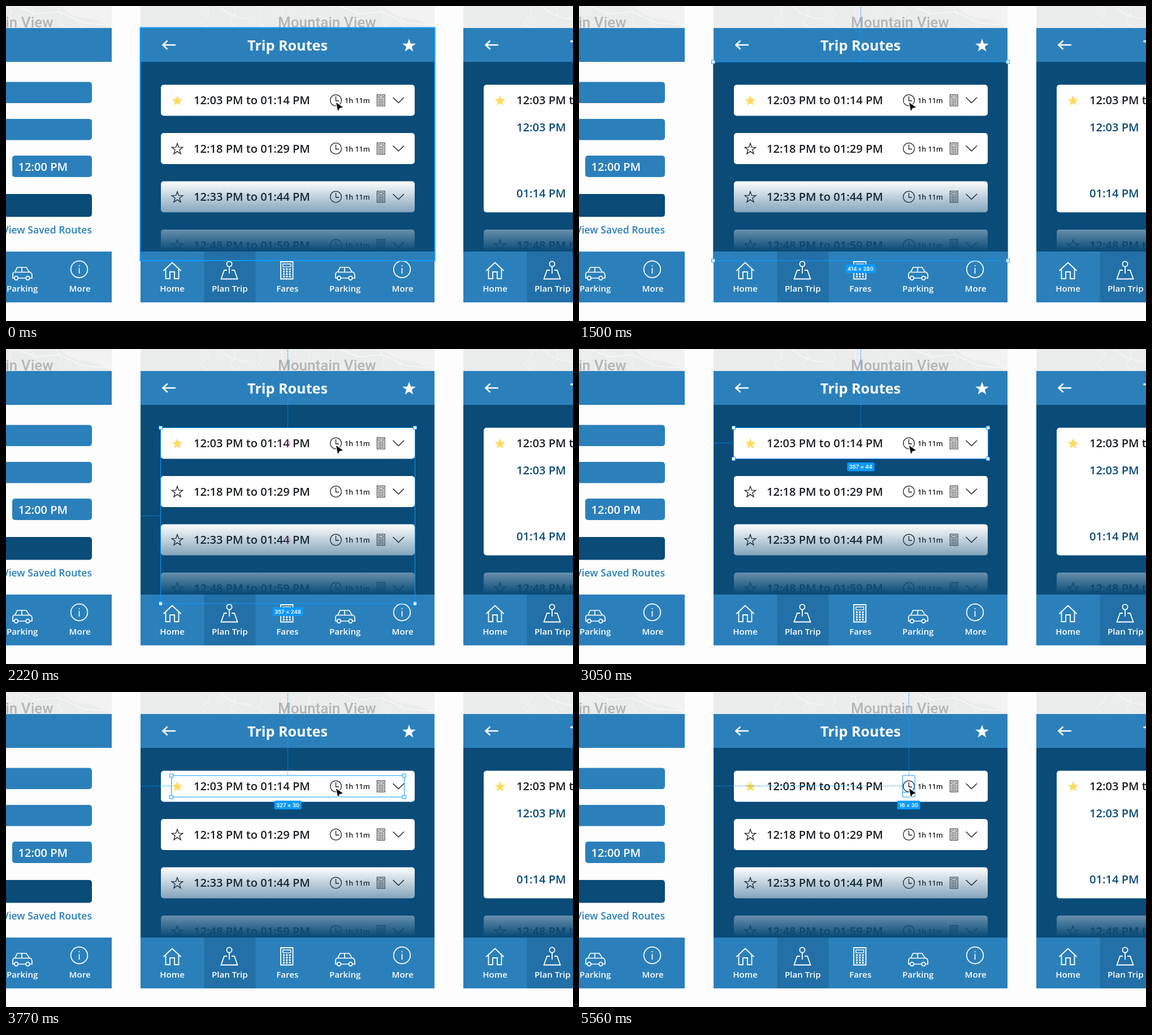
An HTML page with a canvas that plays this animation: 1003x558 px, repeating every 8000 ms.

```html
<!DOCTYPE html>
<html lang="en">
<head>
<meta charset="utf-8">
<title>Trip routes selection</title>
<style>
html, body { margin: 0; width: 100%; height: 100%; overflow: hidden; background: #fdfdfd; }
canvas { display: block; }
</style>
</head>
<body>
<canvas id="stage" width="1003" height="558"></canvas>
<script>
const ctx = document.getElementById('stage').getContext('2d');
const LOOP = 8000, SCREEN_GAP = 571;
const BLUE = '#2b80bb', NAVY = '#0a4b78', ACTIVE = '#2270a7', INK = '#1c1f22';
const ACCENT = '#0d99ff', PINK = '#ff4fc8';

function box(x, y, w, h, fill, r = 0) {
  ctx.fillStyle = fill;
  ctx.beginPath();
  ctx.roundRect(x, y, w, h, r);
  ctx.fill();
}

function frame(x, y, w, h, color, width = 1, r = 0) {
  ctx.strokeStyle = color;
  ctx.lineWidth = width;
  ctx.beginPath();
  ctx.roundRect(x, y, w, h, r);
  ctx.stroke();
}

function path(d, color, width = 1.5) {
  ctx.strokeStyle = color;
  ctx.lineWidth = width;
  ctx.stroke(new Path2D(d));
}

function circle(x, y, r, color, width) {
  ctx.strokeStyle = color;
  ctx.lineWidth = width;
  ctx.beginPath();
  ctx.arc(x, y, r, 0, Math.PI * 2);
  ctx.stroke();
}

function text(str, x, y, size, color, { align = 'left', weight = 600, family = '"Open Sans"' } = {}) {
  ctx.font = `${weight} ${size}px ${family}, sans-serif`;
  ctx.textAlign = align;
  ctx.fillStyle = color;
  ctx.fillText(str, x, y);
}

function star(x, y, r, color, filled) {
  ctx.beginPath();
  for (let i = 0; i < 10; i++) {
    const a = i * Math.PI / 5 - Math.PI / 2, d = i % 2 ? r * 0.4 : r;
    ctx.lineTo(x + d * Math.cos(a), y + d * Math.sin(a));
  }
  ctx.closePath();
  ctx.lineWidth = 1.3;
  ctx.fillStyle = ctx.strokeStyle = color;
  filled ? ctx.fill() : ctx.stroke();
}

function calculator(x, y, w, h, color, line) {
  frame(x, y, w, h, color, line);
  frame(x + w * 0.18, y + h * 0.13, w * 0.64, h * 0.16, color, line * 0.8);
  const dot = w * 0.14;
  for (let row = 0; row < 4; row++)
    for (let col = 0; col < 3; col++)
      box(x + w * (0.25 + col * 0.25) - dot / 2, y + h * (0.43 + row * 0.145) - dot / 2, dot, dot, color);
}

function map() {
  ctx.save();
  ctx.beginPath();
  ctx.rect(238, 0, 520, 39);
  ctx.clip();
  box(238, 0, 520, 39, '#ebecec');
  ctx.fillStyle = '#f2f2f2';
  ctx.fill(new Path2D('M668 0 Q682 18 706 20 T758 39 V0Z'));
  for (let i = 0; i < 9; i++) {
    const x = 356 + i * 43;
    path(`M${x} 0 q${8 + i * 5 % 13} 14 ${-6 + i * 7 % 17} 22 t19 20`, '#f5f5f5', 1.2);
  }
  path('M590 0 L624 14 L665 10 L708 30 L758 34 M378 0 Q394 20 432 23', '#f8f8f8', 1.5);
  text('Mountain View', 481, 38, 26, '#b4b5b5', { weight: 500, family: 'Roboto' });
  ctx.restore();
}

function routeMain(y, times, favorite) {
  star(303, y + 1, 10.3, favorite ? '#ffd95a' : INK, favorite);
  text(times, 332, y + 7, 20.13, INK);
}

function routeCard(y, times, favorite) {
  box(274, y - 27.5, 449, 55, '#fff', 5);
  routeMain(y, times, favorite);
  circle(583.5, y, 9.9, INK, 1.3);
  path(`M583.5 ${y - 7} V${y + 1} H589`, INK, 1.3);
  text('1h 11m', 599, y + 5, 12.58, INK);
  calculator(656.5, y - 10, 13.5, 20, INK, 1.1);
  path(`M684.5 ${y - 5} L694.3 ${y + 4.5} L704 ${y - 5}`, INK, 1.4);
}

function fade() {
  const g = ctx.createLinearGradient(0, 310, 0, 433);
  [[0, 0], [0.45, 0.5], [0.7, 0.62], [1, 1]].forEach(([at, a]) =>
    g.addColorStop(at, `rgba(10,75,120,${a})`));
  box(238, 310, 520, 125, g);
}

function tabBar() {
  box(238, 435, 520, 90, BLUE);
  box(350.5, 435, 91, 90, ACTIVE);
  ['Home', 'Plan Trip', 'Fares', 'Parking', 'More'].forEach((label, i) =>
    text(label, 294 + i * 101.9, 506, 15.1, '#fff', { align: 'center' }));
  path('M278.5 469 L294 454.5 L309.5 469 M282.5 466 V483 H290 V471 H298 V483 H305.5 V466', '#fff', 1.8);
  circle(395, 457, 4.6, '#fff', 1.8);
  path('M395 462 V474 M391 468 H386 L380.5 483.5 H409.5 L404 468 H399', '#fff', 1.8);
  calculator(486, 453, 21.5, 30.5, '#fff', 1.8);
  path('M586 482 H583 V475 Q583 472 587 471 L591 463 H607 L612 471 Q617 472 617 477 V482 H613 M592 482 H606 M587 471.5 H612 M599 463 V471', '#fff', 1.7);
  circle(589, 482, 3.3, '#fff', 1.7);
  circle(609.5, 482, 3.3, '#fff', 1.7);
  circle(700.5, 466.5, 14.8, '#fff', 1.7);
  path('M700.5 464 V474', '#fff', 1.7);
  box(699.4, 459, 2.2, 2.2, '#fff', 1.1);
}

function routesHeader() {
  path('M300 69 H277.5 M285.5 61.5 L277.5 69 L285.5 76.5', '#fff', 2.6);
  text('Trip Routes', 498, 78.5, 25.16, '#fff', { align: 'center', weight: 700 });
  star(713, 70.5, 12.5, '#fff', true);
}

function screen(offset, body) {
  ctx.save();
  ctx.translate(offset, 0);
  map();
  box(238, 39, 520, 60, BLUE);
  body();
  tabBar();
  ctx.restore();
}

function plannerBody() {
  box(274, 134.5, 449, 37.5, BLUE, 5);
  box(274, 200, 449, 37.5, BLUE, 5);
  box(582, 265, 141, 38, BLUE, 5);
  box(274, 333, 449, 40.5, NAVY, 5);
  text('12:00 PM', 592.5, 291.5, 20.13, '#fff');
  text('View Saved Routes', 723, 403, 17.6, BLUE, { align: 'right' });
}

function listBody() {
  routesHeader();
  box(238, 99, 520, 336, NAVY);
  routeCard(167, '12:03 PM to 01:14 PM', true);
  routeCard(252.5, '12:18 PM to 01:29 PM', false);
  routeCard(338, '12:33 PM to 01:44 PM', false);
  routeCard(423.5, '12:48 PM to 01:59 PM', false);
  fade();
}

function expandedBody() {
  routesHeader();
  box(238, 99, 520, 336, NAVY);
  routeCard(423.5, '12:48 PM to 01:59 PM', false);
  fade();
  box(274, 139.5, 449, 226, '#fff', 5);
  routeMain(167, '12:03 PM to 01:14 PM', true);
  text('12:03 PM', 332, 222, 20.13, NAVY);
  text('01:14 PM', 332, 339, 20.13, NAVY);
}

// Edges are left, top, right, bottom; guideY adds a guide from the screen's left edge.
const SELECTIONS = [
  { at: 0, edges: [237.5, 38.5, 758.5, 451], hover: true },
  { at: 630, edges: [237.5, 38.5, 758.5, 451], size: '414 × 328', rings: [69, 275], bar: [780, 99.5] },
  { at: 1500, edges: [237.5, 99, 758.5, 451], size: '414 × 280' },
  { at: 2220, edges: [273.5, 139.5, 723.5, 451], size: '357 × 248', guideY: 295.5, rings: [167.5, 338.5], bar: [2330, 210] },
  { at: 2810, edges: [273.5, 139.5, 723.5, 194.5], size: '357 × 44', guideY: 166.5 },
  { at: 3770, edges: [292.5, 148, 704.5, 186], size: '327 × 30', guideY: 166.5 },
  { at: 4720, edges: [572.5, 148, 704.5, 186], size: '104 × 30', guideY: 166.5 },
  { at: 5560, edges: [572.5, 148, 594, 186], size: '16 × 30', guideY: 166.5, textLayer: true }
];

function sizeLabel(size, x, bottom) {
  ctx.font = '600 9.5px Inter, sans-serif';
  const w = ctx.measureText(size).width + 7;
  box(x - w / 2, bottom + 6.5, w, 15.5, ACCENT, 2);
  text(size, x, bottom + 17.7, 9.5, '#fff', { align: 'center', family: 'Inter' });
}

function selection(s, t) {
  const [left, top, right, bottom] = s.edges;
  const mid = Math.floor((left + right) / 2) + 0.5;
  if (s.hover) {
    frame(left, top, right - left, bottom - top, ACCENT, 2);
    return;
  }
  ctx.setLineDash([2, 1.5]);
  path(`M${mid} ${top - 1} V0`, ACCENT, 1);
  if (s.guideY) path(`M${left - 1} ${s.guideY} H238`, ACCENT, 1);
  ctx.setLineDash([]);
  frame(left, top, right - left, bottom - top, ACCENT);
  if (s.textLayer) path(`M${left} 177.5 H${right}`, ACCENT, 1);
  else for (const x of [left, right])
    for (const y of [top, bottom]) {
      box(x - 3, y - 3, 6, 6, '#fff');
      frame(x - 3, y - 3, 6, 6, ACCENT);
    }
  (s.rings || []).forEach(y => circle(498, y, 4.2, PINK, 1.1));
  if (s.bar && t >= s.bar[0]) box(492, s.bar[1] - 1.5, 12, 3, PINK);
  sizeLabel(s.size, (left + right) / 2, bottom);
}

function cursor() {
  const shape = new Path2D('M584 171 L596 179.5 L590.2 180.8 L587.2 186 Z');
  ctx.lineJoin = 'round';
  ctx.strokeStyle = '#fff';
  ctx.lineWidth = 2.4;
  ctx.stroke(shape);
  ctx.fillStyle = '#000';
  ctx.fill(shape);
  ctx.lineJoin = 'miter';
}

function draw(now) {
  const t = now % LOOP;
  box(0, 0, 1003, 558, '#fdfdfd');
  screen(-SCREEN_GAP, plannerBody);
  screen(0, listBody);
  screen(SCREEN_GAP, expandedBody);
  selection(SELECTIONS.findLast(s => t >= s.at), t);
  cursor();
  requestAnimationFrame(draw);
}
draw(performance.now());
</script>
</body>
</html>
```
